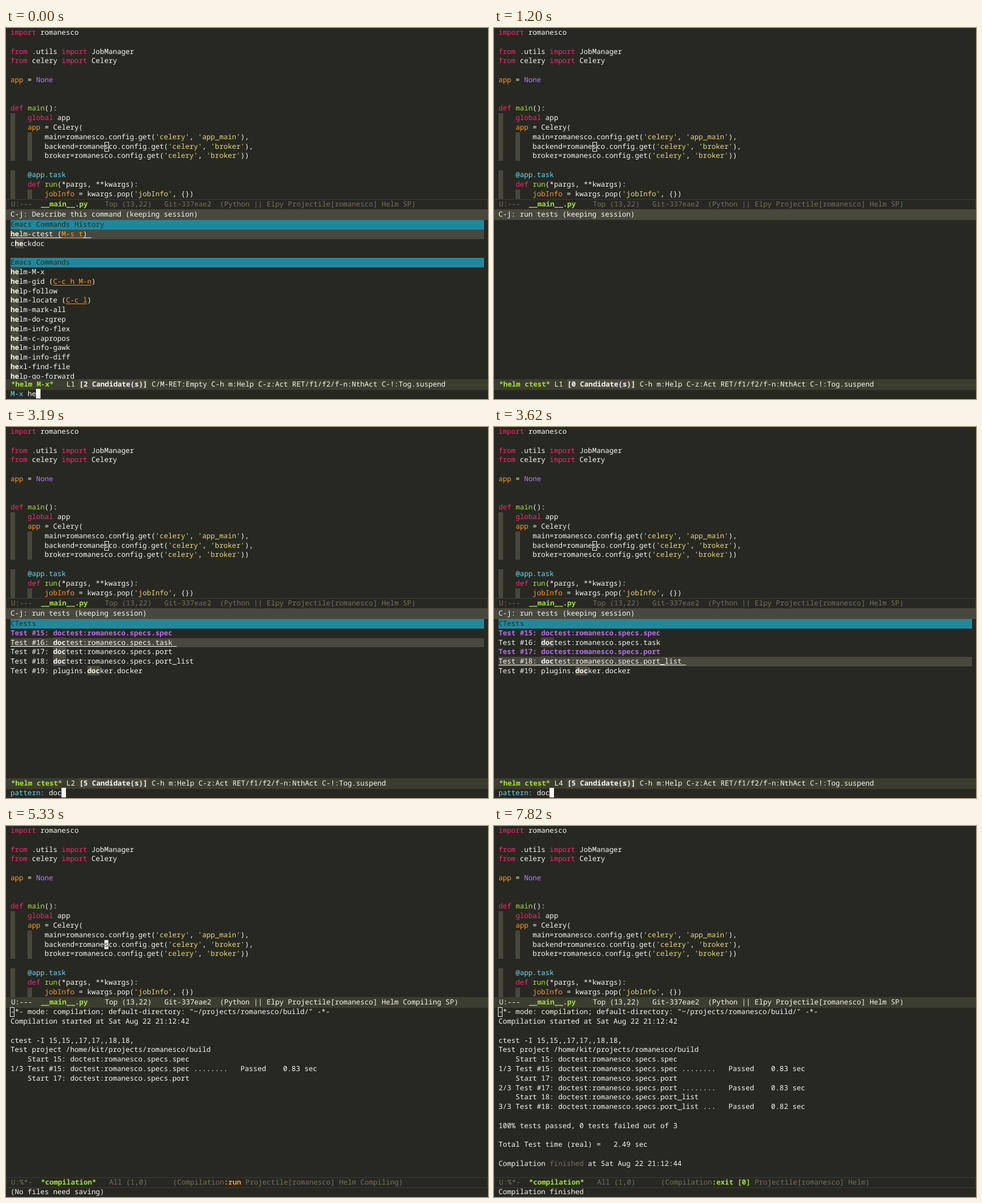
Recreate the animation shown at these times as an HTML page. Size 852 px wide and 657 px high, loop 7920 ms.

```html
<!DOCTYPE html>
<html lang="en">
<head>
<meta charset="utf-8">
<title>Running ctest from Emacs</title>
<style>
  html, body { margin: 0; width: 100%; height: 100%; overflow: hidden; background: #272822; }
  #stage {
    position: relative; width: 852px; height: 657px; overflow: hidden;
    background: #272822; color: #f8f8f2;
    font: 12.55px/16px "Noto Sans Mono", "DejaVu Sans Mono", monospace;
    font-variant-ligatures: none; text-rendering: geometricPrecision;
  }
  #stage div { position: absolute; white-space: pre; box-sizing: border-box; }
  i { font-style: normal; }
  .row { left: 8px; right: 7px; height: 16.8px; }
  .guide { width: 7.5px; background: #49483e; }
  .pane { left: 0; width: 852px; overflow: hidden; }
  .mode { left: 0; width: 852px; height: 18.6px; padding-left: 9px; line-height: 18px; }
  .on { background: #3c3d31; }
  .off { border: 1px solid #3b3c35; padding-left: 8px; line-height: 16px; color: #75715e; }
  .head { background: #49483e; padding-left: 8px; }
  .src { background: #21889c; color: #272822; }
  .sel { background: #49483e; }
  .sel > i, .key { text-decoration: underline 1px; text-underline-offset: 2px; }
  .hit { background: #49483e; font-weight: bold; }
  .mark { color: #b070e0; font-weight: bold; }
  .key, .o { color: #fd971f; }
  .p { color: #f92672; }
  .g { color: #a6e22e; }
  .v { color: #ae81ff; }
  .y { color: #e6db74; }
  .c { color: #66d9ef; }
  .dim { color: #75715e; }
  .b { font-weight: bold; }
  .cur { background: #f8f8f0; }
  .box { width: 8px; height: 17px; border: 1px solid #f8f8f0; }
  #point.solid { background: #f8f8f0; color: #272822; }
  #beam { position: absolute; left: 171px; top: 210px; }
</style>
</head>
<body>
<div id="stage">
  <div id="code"></div>
  <div id="point"></div>
  <div id="lower"></div>
  <svg id="beam" width="10" height="14" fill="none">
    <path d="M2 2H4L5 3L6 2H8M5 3V11M2 12H4L5 11L6 12H8" stroke="#272822" stroke-width="3"/>
    <path d="M2 2H4L5 3L6 2H8M5 3V11M2 12H4L5 11L6 12H8" stroke="#e8e8e2"/>
  </svg>
</div>
<script>
const LOOP = 7920, ROW = 16.8, COL = 7.53;
const $ = id => document.getElementById(id);
const tag = (cls, text) => `<i class="${cls}">${text}</i>`;
const div = (cls, top, html, more = '') =>
  `<div class="${cls}" style="top:${top.toFixed(1)}px;${more}">${html}</div>`;
const row = (n, html, cls = '') => div('row ' + cls, n * ROW, html);
const rows = lines => lines.map((l, n) => l ? row(n, l) : '').join('');
const pane = (top, bottom, html) => div('pane', top, html, `height:${bottom - top}px`);

// Upper window: Python buffer
const get = (name, key, end) =>
  `        ${name}=romanesco.config.get(${tag('y', "'celery'")}, ${tag('y', `'${key}'`)})${end}`;
const source = [
  tag('p', 'import') + ' romanesco',
  '',
  `${tag('p', 'from')} .utils ${tag('p', 'import')} JobManager`,
  `${tag('p', 'from')} celery ${tag('p', 'import')} Celery`,
  '',
  `${tag('o', 'app')} = ${tag('v', 'None')}`,
  '', '',
  `${tag('p', 'def')} ${tag('g', 'main')}():`,
  `    ${tag('p', 'global')} app`,
  `    ${tag('o', 'app')} = Celery(`,
  get('main', 'app_main', ','),
  get('backend', 'broker', ','),
  get('broker', 'broker', ')'),
  '',
  '    ' + tag('c', '@app.task'),
  `    ${tag('p', 'def')} ${tag('g', 'run')}(*pargs, **kwargs):`,
  `        ${tag('o', 'jobInfo')} = kwargs.pop(${tag('y', "'jobInfo'")}, {})`
];
const guide = (col, from, to) =>
  div('guide', from * ROW, '', `left:${8 + col * COL}px;height:${(to - from) * ROW}px`);
$('code').innerHTML = guide(0, 9, 14) + guide(4, 11, 14) + guide(0, 15, 18.04) +
  guide(4, 17, 18.04) + div('pane', 0, rows(source), 'height:303px');

// Shared pieces of the lower half
const topMode = (active, modes) => div('mode ' + (active ? 'on' : 'off'), 303,
  `U:---  ${tag('g b', '__main__.py')}    Top (13,22)   Git-337eae2  ` +
  `(Python || Elpy Projectile[romanesco] ${modes} SP)`);
const echo = html => div('row', 640.3, html);
const prompt = (label, text, cursor) =>
  echo(tag('c', label) + text + (cursor ? tag('cur', ' ') : ''));

// Greedy in-order match; null when some letter is missing
function match(name, query) {
  let k = 0, out = '';
  for (const ch of name) out += ch === query[k] ? (k++, tag('hit', ch)) : ch;
  return k < query.length ? null : out.replaceAll('</i><i class="hit">', '');
}

function helm({ title, help, list, line, count, keys, mini }) {
  return topMode(false, 'Helm') +
    div('mode head', 321, `C-j: ${help} (keeping session)`) +
    pane(340, 622, list) +
    div('mode on', 622, tag('g b', `*helm ${title}*`.padEnd(13).trimEnd()) +
      ' '.repeat(13 - title.length - 7) + `L${line} ` +
      tag('hit', `[${count} Candidate(s)]`) +
      ` ${keys}C-h m:Help C-z:Act RET/f1/f2/f-n:NthAct C-!:Tog.suspend`) + mini;
}

const past = ['helm-ctest (M-s t)', 'checkdoc'];
const general = ['helm-M-x', 'helm-gid (C-c h M-n)', 'help-follow', 'helm-locate (C-c l)',
  'helm-mark-all', 'helm-do-zgrep', 'helm-info-flex', 'helm-c-apropos', 'helm-info-gawk',
  'helm-info-diff', 'hexl-find-file', 'help-go-forward', 'helm-info-sed', 'helm-mini (C-x b)',
  'helm-occur', 'helm-imenu', 'helm-regexp', 'helm-find'];
const narrow = ['helm-ctest (M-s t)', 'helm-c-etags-select', 'helm-delete-current-selection',
  'helm-c-grep-run-default-action', 'helm-c-grep-run-other-window-action',
  'helm-projectile-find-files-eshell-command-on-file-action', 'helm-select-xfont (C-c h F)',
  'helm-etags-select (C-c h e)', 'helm-configuration', 'helm-projectile-ag (C-c p s s)',
  'helm-select-action', 'helm-projectile-on', 'helm-browse-project'];

const filter = (names, query) => names.map(item => {
  const [name, key] = item.split(' (');
  const hit = match(name, query);
  return hit && hit + (key ? ` (${tag('key', key.slice(0, -1))})` : '');
}).filter(Boolean);

function commands(text, query, cursor = true) {
  const recent = filter(past, query);
  const all = filter(query.length > 6 ? narrow : general, query);
  const n = recent.length + 2;
  const list = row(0, 'Emacs Commands History', 'src') +
    recent.map((h, k) => k ? row(k + 1, h) : row(1, tag('', h + ' '), 'sel')).join('') +
    row(n, 'Emacs Commands', 'src') + all.map((h, k) => row(n + 1 + k, h)).join('');
  return helm({ title: 'M-x', help: 'Describe this command', list, line: 1,
    count: recent.length, keys: 'C/M-RET:Empty ', mini: prompt('M-x ', text, cursor) });
}

const spec = name => 'doctest:romanesco.specs.' + name;
const tests = ['pep8_style_core', 'flake8_style_core', 'pep8_style_core_tests', 'graph', 'image',
  'io', 'number', 'string', 'table', 'tree', 'workflow', 'pickle', 'spec', 'directory',
  spec('spec'), spec('task'), spec('port'), spec('port_list'), 'plugins.docker.docker',
  'plugins.r', 'plugins.vtk', 'plugins.spark', 'plugins.types'];

function ctest(text, query, { line = 1, marks = [], cursor = true, mini } = {}) {
  const found = tests.map((name, k) => ({ name, id: k + 1, hit: match(name, query) }))
    .filter(t => t.hit);
  const list = row(0, 'CTests', 'src') + found.map(({ name, id, hit }, k) => {
    const label = `Test ${('#' + id).padStart(3)}: `;
    const html = marks.includes(id) ? tag('mark', label + name) : label + hit;
    return k + 1 === line ? row(k + 1, tag('', html + ' '), 'sel') : row(k + 1, html);
  }).join('');
  return helm({ title: 'ctest', help: 'run tests', list, line, count: found.length, keys: '',
    mini: mini || prompt('pattern: ', text, cursor) });
}
const picked = (line, marks, more) => ctest('doc', 'doc', { line, marks, ...more });

const waiting = () => helm({ title: 'ctest', help: 'run tests', list: '', line: 1, count: 0,
  keys: '', mini: '' });

// Compilation buffer
const start = (id, name) => `    Start ${id}: ${spec(name)}`;
const passed = (n, id, name, sec) =>
  `${n}/3 Test #${id}: ${(spec(name) + ' ').padEnd(37, '.')}   Passed    ${sec} sec`;
const log = [
  '-*- mode: compilation; default-directory: "~/projects/romanesco/build/" -*-',
  'Compilation started at Sat Aug 22 21:12:42',
  '',
  'ctest -I 15,15,,17,17,,18,18,',
  'Test project /home/kit/projects/romanesco/build',
  start(15, 'spec'), passed(1, 15, 'spec', 0.83),
  start(17, 'port'), passed(2, 17, 'port', 0.83),
  start(18, 'port_list'), passed(3, 18, 'port_list', 0.82),
  '',
  '100% tests passed, 0 tests failed out of 3',
  '',
  'Total Test time (real) =   2.49 sec',
  '',
  `Compilation ${tag('dim', 'finished')} at Sat Aug 22 21:12:44`
];
const noFiles = echo('(No files need saving)');

function compile(lines) {
  const done = lines === log.length;
  const state = done ? tag('g b', ':exit [0]') : tag('o b', ':run');
  return topMode(true, done ? 'Helm' : 'Helm Compiling') +
    pane(321.2, 622, rows(log.slice(0, lines))) +
    div('box', 321.2, '', 'left:7px') +
    div('mode off', 622, `U:%*-  ${tag('g b', '*compilation*')}   All (1,0)      ` +
      `(Compilation${state} Projectile[romanesco] Helm${done ? '' : ' Compiling'})`) +
    (done ? echo('Compilation finished') : noFiles);
}

const steps = [
  [0, commands('he', 'he')],
  [90, commands('hel', 'he')],
  [150, commands('hel', 'hel')],
  [240, commands('helm', 'hel')],
  [310, commands('helm', 'helm')],
  [470, commands('helm-', 'helm')],
  [530, commands('helm-', 'helm-')],
  [600, commands('helm-c', 'helm-')],
  [660, commands('helm-c', 'helm-c')],
  [730, commands('helm-ct', 'helm-c')],
  [790, commands('helm-ct', 'helm-ct')],
  [850, commands('helm-cte', 'helm-ct')],
  [910, commands('helm-cte', 'helm-cte')],
  [1150, commands('helm-cte', 'helm-cte', false)],
  [1200, waiting()],
  [1540, ctest('', '')],
  [2060, ctest('', '', { cursor: false })],
  [2360, ctest('d', '')],
  [2400, ctest('d', 'd')],
  [2440, ctest('do', 'd')],
  [2480, ctest('do', 'do')],
  [2520, ctest('doc', 'do')],
  [2570, picked(1)],
  [3010, picked(1, [], { cursor: false })],
  [3150, picked(1, [15])],
  [3190, picked(2, [15])],
  [3380, picked(3, [15])],
  [3620, picked(4, [15, 17])],
  [3800, picked(5, [15, 17, 18])],
  [4340, picked(5, [15, 17, 18], { mini: noFiles })],
  [4390, compile(6)],
  [5170, compile(8)],
  [5990, compile(10)],
  [6840, compile(log.length)]
];
const blinks = [4390, 4850, 5330, 5840, 6320, 6840, 7310, 7820];

const point = $('point'), lower = $('lower'), beam = $('beam');
point.style.cssText = `left:${8 + 22 * COL}px;top:${12 * ROW}px`;
let shown = -1;

function draw(now) {
  const t = now % LOOP;
  const k = steps.findLastIndex(([at]) => at <= t);
  if (k !== shown) lower.innerHTML = steps[shown = k][1];

  const flips = blinks.filter(at => at <= t).length;
  point.className = flips ? 'solid' : 'box';
  point.textContent = flips ? 's' : '';
  point.style.visibility = flips && flips % 2 === 0 ? 'hidden' : 'visible';
  beam.style.display = t >= 1590 && t < 2360 ? '' : 'none';
}

const began = performance.now();
(function tick() {
  draw(performance.now() - began);
  requestAnimationFrame(tick);
})();
</script>
</body>
</html>
```
